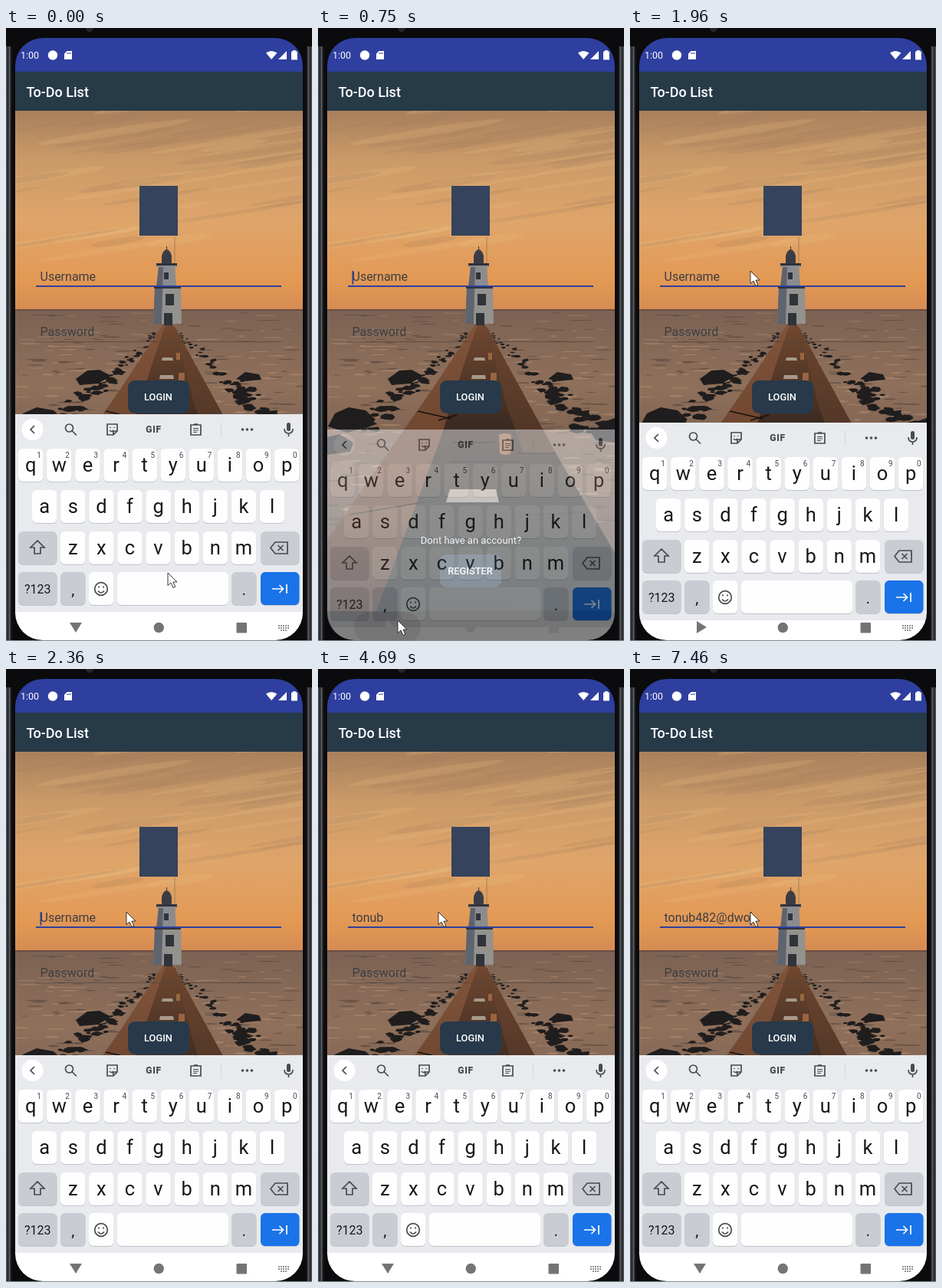
An HTML page for the animation above (8 s loop, 399 by 800 pixels).

```html
<!DOCTYPE html>
<html lang="en">
<head>
<meta charset="utf-8">
<title>To-Do List login</title>
<style>
  html, body { margin: 0; width: 100%; height: 100%; overflow: hidden; background: #0b0b0d; }
  svg { display: block; font-family: Roboto, sans-serif; }
  .mid { text-anchor: middle; }
  .bold { font-weight: 500; }
  .line { fill: none; stroke: #474b50; stroke-width: 1.7; }
</style>
</head>
<body>
<svg width="399" height="800" viewBox="0 0 399 800">
  <defs>
    <clipPath id="screen"><rect x="12" y="13" width="375" height="786" rx="36"/></clipPath>
    <clipPath id="photoBox"><rect x="12" y="108" width="375" height="653"/></clipPath>
    <linearGradient id="sky" x2="0" y2="1">
      <stop offset="0" stop-color="#a9805d"/>
      <stop offset=".25" stop-color="#cb9a68"/>
      <stop offset=".55" stop-color="#dfa56a"/>
      <stop offset=".85" stop-color="#e39955"/>
      <stop offset="1" stop-color="#d58b52"/>
    </linearGradient>
    <linearGradient id="sea" x2="0" y2="1">
      <stop offset="0" stop-color="#7c6253"/>
      <stop offset=".25" stop-color="#8f705b"/>
      <stop offset="1" stop-color="#4a3a33"/>
    </linearGradient>
    <linearGradient id="slope" x2="0" y2="1">
      <stop offset="0" stop-color="#80543a"/>
      <stop offset=".5" stop-color="#6a422d"/>
      <stop offset="1" stop-color="#33211a"/>
    </linearGradient>
    <linearGradient id="deck" x2="0" y2="1">
      <stop offset="0" stop-color="#704830"/>
      <stop offset=".35" stop-color="#3b2a21"/>
      <stop offset=".65" stop-color="#1d1d1b"/>
      <stop offset="1" stop-color="#081012"/>
    </linearGradient>
    <linearGradient id="bezel">
      <stop offset="0" stop-color="#62696d"/>
      <stop offset=".25" stop-color="#1a1b1d"/>
      <stop offset=".5" stop-color="#5a5e62"/>
      <stop offset=".75" stop-color="#151517"/>
      <stop offset="1" stop-color="#0b0b0d"/>
    </linearGradient>
  </defs>

  <rect id="edge" y="24" width="9" height="776" fill="url(#bezel)"/>
  <use href="#edge" transform="translate(399 0) scale(-1 1)"/>
  <path d="M0 799.5H399" stroke="#858b8e"/>
  <circle cx="109" cy="0" r="5" fill="#25262a"/>

  <g clip-path="url(#screen)">
    <rect x="12" y="13" width="375" height="786"/>
    <g clip-path="url(#photoBox)">
      <rect x="12" y="108" width="375" height="261" fill="url(#sky)"/>
      <g id="clouds" transform="rotate(-9 200 240)"/>
      <rect x="12" y="368" width="375" height="393" fill="url(#sea)"/>
      <path d="M12 368H387" stroke="#6b4e43" stroke-width="2"/>
      <g id="waves"/>
      <g id="rocks" fill="#1f1d1d">
        <path d="M13 520L22 503L40 495L62 499L75 511L66 521L38 528ZM12 534L28 530L46 541L42 553L12 557ZM91 458L106 447L122 446L137 454L120 464L96 466ZM300 458L312 449L330 452L333 459L312 461ZM356 528L376 513L387 509V541L362 538Z"/>
      </g>
      <path d="M204 388L150 470L12 668V761H387V685L310 555L219 388Z" fill="url(#slope)"/>
      <path d="M208 388L190 440L160 535L76 761H387V685L310 555L219 388Z" fill="url(#deck)"/>
      <path d="M219 388L245 490L268 555H310Z" fill="#6b452f" opacity=".5"/>
      <path d="M130 500L174 510M42 635L142 618M174 566H265M174 541H230M157 512L181 505M260 555L310 555M275 635L355 632" stroke="#15110f" stroke-width="1.5" fill="none"/>
      <path d="M204 430H217L218 434H203ZM201 453H218L219 458H200ZM172 602H232L236 619H167Z" fill="#a79a8c"/>
      <path d="M222 424h5v9h-5zM225 450h8v10h-8zM236 531q8-4 16 0l-1 24q-7 4-14 0z" fill="#9a653f"/>
      <path d="M220 272V390" stroke="#9d8061"/>
      <path d="M203 298q1-7 6-9V285h1v4q5 2 6 9V308H203Z" fill="#3a3d45"/>
      <path d="M196 307H223V312H220L222 338H196L199 312H196Z" fill="#8b8c90"/>
      <path d="M194 338H228L229 386H192Z" fill="#94928f"/>
      <path d="M199 312H205L203 386H192L194 338H196Z" fill="#5d646e"/>
      <path d="M196 307H223V310H196ZM193 336H228V340H193ZM208 347H219V362H208ZM206 319H212V328H206ZM206 372H217V388H206Z" fill="#30333a"/>
    </g>

    <rect x="12" y="13" width="375" height="45" fill="#2e3f9f"/>
    <rect x="12" y="57" width="375" height="51" fill="#273a48"/>
    <g fill="#fff">
      <text x="19" y="40" font-size="12.5">1:00</text>
      <circle cx="61" cy="35.5" r="6.2"/>
      <path d="M79.500 30H86V41H76V33.500ZM339 32.500q7-5 14.500 0L346.200 41ZM366 30V41H355ZM372 30.500h2.200v-1.500h3.500v1.500h2.200V41.500h-7.900z"/>
      <path d="M80 32v2M82 32v2M84 32v2" stroke="#2e3f9f"/>
      <text x="26.500" y="90" font-size="18" class="bold">To-Do List</text>
    </g>

    <rect x="174" y="206" width="50" height="65" fill="#35435d"/>

    <g font-size="16" fill="#3d3f43">
      <text id="username" x="44.500" y="329.500"></text>
      <text x="44.500" y="402">Password</text>
    </g>
    <path d="M39 337H359" stroke="#30419c" stroke-width="2"/>
    <path d="M39 409.500H359" stroke="#4d4039" opacity=".65"/>
    <rect id="caret" y="317" width="1.800" height="17.500" fill="#3040a0"/>

    <g class="mid bold" font-size="12.800" fill="#fff">
      <rect x="159" y="460" width="80" height="43" rx="9" fill="#27394a"/>
      <text x="198.500" y="486">LOGIN</text>
      <rect x="159" y="687" width="80" height="43" rx="9" fill="#27394a"/>
      <text x="198.500" y="713">REGISTER</text>
      <text x="199.500" y="673" font-size="13" font-weight="400">Dont have an account?</text>
    </g>

    <g id="keyboard">
      <rect x="12" y="504" width="375" height="258" fill="#e8eaee"/>
      <rect x="12" y="762" width="375" height="60" fill="#fff"/>
      <circle cx="34.500" cy="524" r="14" fill="#fff"/>
      <g class="line">
        <path d="M37 519l-5 5l5 5M86 525.500l6 6"/>
        <circle cx="82.500" cy="522" r="5"/>
        <path d="M132 517h13v9l-5 5h-8zM140 531v-5h5M135 525q3 3 5 0M136 521v1M141 521v1"/>
        <path d="M241 518h13v13h-13zM245 517h5"/>
        <path d="M244 522.500h7M244 525h7M244 527.500h5" stroke-width="1.200" style="stroke-width:1.200"/>
        <path d="M363 523q0 6 5.500 6t5.500-6M368.500 529v4"/>
      </g>
      <path d="M280.500 514v20" stroke="#d3d6da"/>
      <rect x="366" y="515" width="5" height="11" rx="2.500" fill="#474b50"/>
      <g fill="#474b50">
        <circle cx="308.500" cy="524" r="1.800"/><circle cx="314.500" cy="524" r="1.800"/><circle cx="320.500" cy="524" r="1.800"/>
        <text x="192.500" y="528" font-size="12" font-weight="900" letter-spacing=".7" class="mid">GIF</text>
      </g>
      <g id="keys" class="mid"/>
      <g class="line">
        <path d="M41 669l-9 9h5v8h8v-8h5zM351 671h16v15h-16l-6-7.500zM354.500 675l7 7M361.500 675l-7 7"/>
        <circle cx="124" cy="732" r="8.300"/>
        <path d="M120 734.500q4 5 8 0M121 728.500v2M127 728.500v2"/>
        <path d="M347 732h14M356.500 727l5 5l-5 5M366 726v12" style="stroke:#fff"/>
      </g>
    </g>

    <rect id="ripple" x="47" y="762" width="87" height="40" rx="20" opacity=".09"/>
    <g id="nav">
      <path id="back" d="M-8-6H8L0 7Z"/>
      <circle cx="199.300" cy="782.500" r="6.700"/>
      <rect x="300.500" y="776" width="13.500" height="13.500" rx="1"/>
      <path id="imeIcon" d="M355 780H369M355 783H369M358 786H366" stroke-width="2" stroke-dasharray="2 1"/>
    </g>
  </g>
  <path id="pointer" d="M0 0V16.500L4 13L7 19.500L9.800 18.200L7 12H12Z" fill="#fff" stroke="#222" stroke-width=".9"/>
</svg>

<script>
const $ = id => document.getElementById(id);
const LOOP = 8000;
const NAME = "tonub482@dwo";

function add(parent, tag, attrs, text = "") {
  const node = document.createElementNS("http://www.w3.org/2000/svg", tag);
  for (const key in attrs) node.setAttribute(key, attrs[key]);
  node.textContent = text;
  return parent.appendChild(node);
}

let seed = 11;
const rnd = () => (seed = seed * 16807 % 2147483647) / 2147483647;

function paintScenery() {
  for (let i = 0; i < 45; i++) {
    add($("clouds"), "ellipse", {
      cx: rnd() * 400, cy: 95 + rnd() * 200, rx: 35 + rnd() * 80, ry: 1 + rnd() * 5,
      fill: i % 2 ? "#e9ba82" : "#a07a5b", opacity: 0.22
    });
  }
  for (let i = 0; i < 420; i++) {
    const depth = rnd();
    add($("waves"), "ellipse", {
      cx: 12 + rnd() * 375, cy: 372 + depth * 320, rx: 3 + rnd() * 13, ry: 0.5 + depth * 2 * rnd(),
      fill: i % 2 ? "#c39c7d" : "#3d3331", opacity: 0.45
    });
  }
  // Rubble spreads outwards and grows along both sides of the pier.
  for (let i = 0; i < 150; i++) {
    const near = rnd(), side = i % 2 ? 1 : -1, size = 1 + (0.3 + rnd()) * near * 6;
    const x = 211 + side * (12 + near * 118 + rnd() * 45 * near), y = 391 + near * 130 + rnd() * 12;
    const points = [0, 1, 2, 3, 4, 5, 6].map(k => {
      const reach = size * (0.7 + rnd() * 0.7), angle = k * Math.PI * 2 / 7;
      return `${x + reach * 1.4 * Math.cos(angle)},${y + reach * 0.6 * Math.sin(angle)}`;
    });
    add($("rocks"), "polygon", { points: points.join(" ") });
  }
}

function key(x, y, width, label, fill = "#fefefe", size = 25.5) {
  const keys = $("keys");
  add(keys, "rect", { x, y: y + 1, width, height: 43, rx: 6, fill: "#bfc3c9" });
  add(keys, "rect", { x, y, width, height: 43, rx: 6, fill });
  add(keys, "text", { x: x + width / 2, y: y + (size < 20 ? 28 : 30), "font-size": size, fill: "#17181a" }, label);
}

function paintKeys() {
  const grey = "#c9ccd3", pitch = 37.1;
  [["qwertyuiop", 16, 549], ["asdfghjkl", 34, 603], ["zxcvbnm", 71, 657]].forEach(([letters, x, y]) =>
    [...letters].forEach((letter, i) => key(x + i * pitch, y, 32.5, letter)));
  [..."1234567890"].forEach((digit, i) =>
    add($("keys"), "text", { x: 43 + i * pitch, y: 560.5, "font-size": 10, fill: "#45494e" }, digit));
  key(16, 657, 50.5, "", grey);
  key(332, 657, 50.5, "", grey);
  key(16, 710, 50.5, "?123", grey, 16);
  key(71, 710, 32.5, ",", grey, 21);
  key(108, 710, 32.5, "");
  key(145, 710, 145, "");
  key(294, 710, 32.5, ".", grey, 21);
  key(332, 710, 50.5, "", "#1a73e8");
}

// Each track lists [start time, ...values]; values hold until the next entry.
const pointerTrack = [
  [0, 211, 711], [120, 164, 737], [240, 116, 760], [390, 104, 773], [870, 134, 640],
  [990, 153, 465], [1140, 148, 400], [1260, 144.5, 343], [1410, 154, 325], [1530, 157, 317]
];
const keyboardTrack = [
  [0, 0, 1], [630, 4, 0.85], [750, 20, 0.5], [870, 44, 0.15], [990, 60, 0], [1960, 11, 1], [2080, 0, 1]
];
const backTrack = [[0, 0], [750, 45], [870, 80], [990, 90], [1960, 270], [2080, 360]];
const caretTrack = [
  [0, 0], [510, 1], [990, 0], [1530, 1], [1960, 0], [2360, 1], [2790, 0],
  [3330, 1], [4690, 0], [5190, 1], [6440, 0], [6560, 1]
];
const typingTimes = [3330, 3450, 3750, 3870, 4140, 5190, 5490, 5730, 6560, 7150, 7310, 7460];

const at = (track, t) => track.findLast(([start]) => start <= t).slice(1);

function draw(t) {
  const [px, py] = at(pointerTrack, t);
  $("pointer").setAttribute("transform", `translate(${px} ${py})`);

  const [drop, alpha] = at(keyboardTrack, t);
  $("keyboard").setAttribute("transform", `translate(0 ${drop})`);
  $("keyboard").setAttribute("opacity", alpha);

  const navColor = alpha > 0.4 ? "#747474" : "#fff";
  $("nav").setAttribute("fill", navColor);
  $("imeIcon").setAttribute("stroke", navColor);
  $("imeIcon").setAttribute("opacity", t >= 630 && t < 1810 ? 0 : 0.8);
  const [turn] = at(backTrack, t);
  $("back").setAttribute("transform", `translate(${turn === 270 ? 93 : 91} 782) rotate(${turn})`);
  $("ripple").setAttribute("visibility", t >= 390 && t < 870 ? "visible" : "hidden");

  const typed = typingTimes.filter(start => start <= t).length;
  const field = $("username");
  field.textContent = NAME.slice(0, typed) || "Username";
  $("caret").setAttribute("x", 44.5 + (typed ? field.getComputedTextLength() : 0));
  $("caret").setAttribute("opacity", at(caretTrack, t)[0]);
}

paintScenery();
paintKeys();
const began = performance.now();
function frame() {
  draw((performance.now() - began) % LOOP);
  requestAnimationFrame(frame);
}
frame();
</script>
</body>
</html>
```
